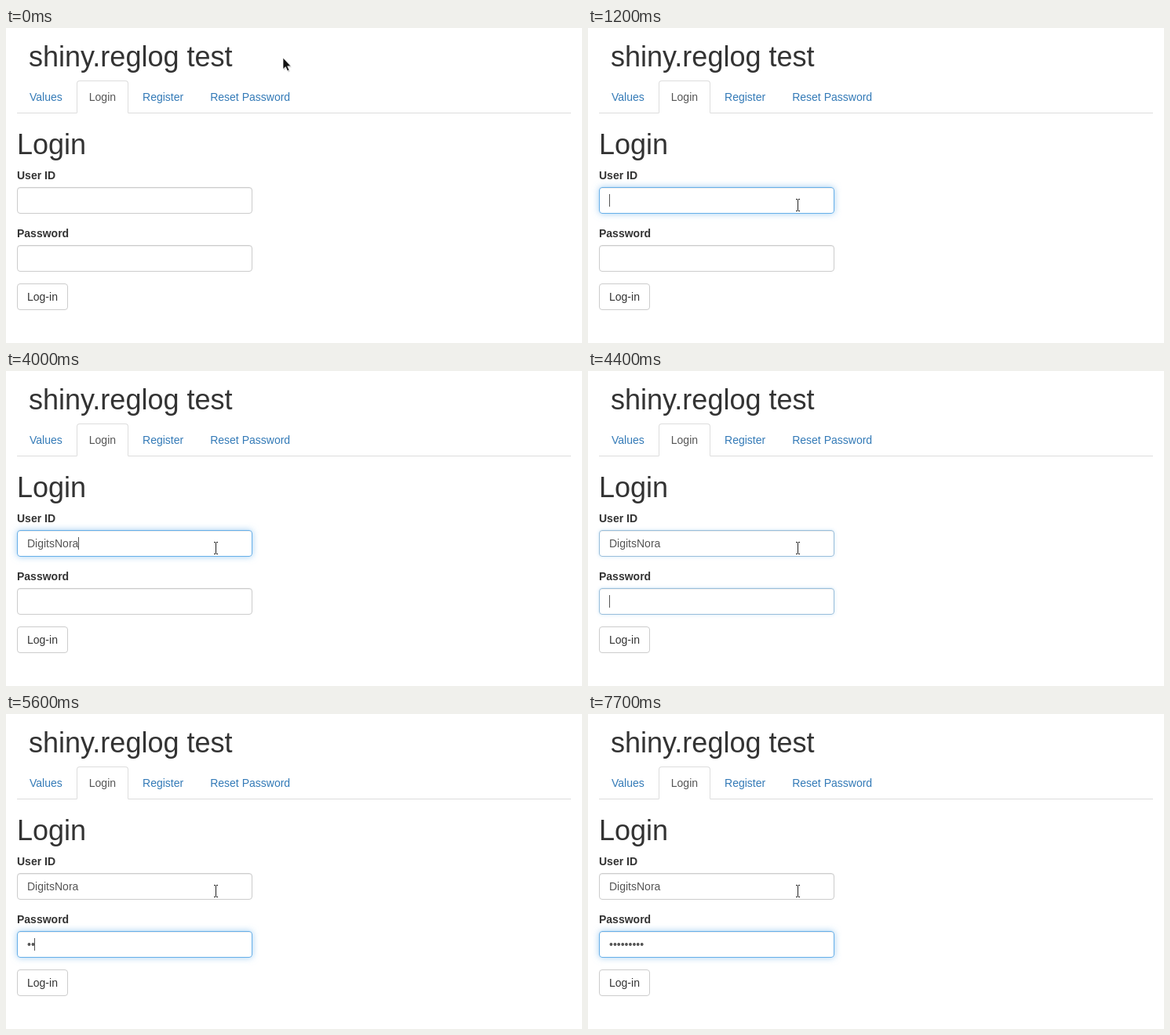
These frames come from a looping animation (734x402 px, 8000 ms). An HTML page:

```html
<!DOCTYPE html>
<html lang="en">
<head>
<meta charset="utf-8">
<title>Login form</title>
<style>
* { box-sizing: border-box; }
html, body { margin: 0; width: 100%; height: 100%; overflow: hidden; background: #fff; }
body { position: relative; font: 14px/20px "Liberation Sans", Arial, sans-serif; color: #333; }
main { position: absolute; left: 14px; top: 17px; width: 706px; }
h1 { margin: 0 0 10px; font-size: 36px; font-weight: 500; line-height: 1.1; }
.title { padding-left: 15px; }
nav { display: flow-root; height: 42px; margin-bottom: 20px; border-bottom: 1px solid #ddd; }
nav span { float: left; height: 42px; margin-right: 2px; padding: 10px 15px; border: 1px solid transparent; border-radius: 4px 4px 0 0; color: #337ab7; }
nav .active { color: #555; background: #fff; border-color: #ddd #ddd transparent; }
label { display: block; margin-bottom: 5px; font-weight: 700; }
.field { width: 300px; height: 34px; margin-bottom: 15px; padding: 6px 12px; border: 1px solid #ccc; border-radius: 4px; color: #555; white-space: pre; }
.button { display: inline-block; height: 34px; padding: 6px 12px; border: 1px solid #ccc; border-radius: 4px; }
#caret { position: absolute; width: 1px; height: 16px; background: #555; }
svg { position: absolute; left: 0; top: 0; overflow: visible; pointer-events: none; }
</style>
</head>
<body>
<main>
  <h1 class="title">shiny.reglog test</h1>
  <nav><span>Values</span><span class="active">Login</span><span>Register</span><span>Reset Password</span></nav>
  <h1>Login</h1>
  <label>User ID</label>
  <div class="field" id="user"><span></span></div>
  <label>Password</label>
  <div class="field" id="pass"><span></span></div>
  <div class="button">Log-in</div>
</main>
<div id="caret"></div>
<svg id="arrow" width="14" height="20">
  <path d="M2 3V17L5.2 14.2L7.6 19.4L10 18.3L7.7 13.3H12Z" fill="#000" opacity=".18"/>
  <path d="M1 1V15.6L4.3 12.6L6.6 17.8L9 16.8L6.7 11.8H11.2Z" fill="#111" stroke="#fff" stroke-width=".7"/>
</svg>
<svg id="beam" width="7" height="17" shape-rendering="crispEdges">
  <path d="M0 0H7V2H5V15H7V17H0V15H2V2H0Z" fill="#fff"/>
  <path d="M1 0H3V1H4V0H6V1H4V15H6V16H4V15H3V16H1V15H3V1H1Z" fill="#222"/>
</svg>
<script>
const LOOP = 8000, STEP = 100;
const USER = "DigitsNora";
const userKeys = [2200, 2300, 2700, 2700, 2800, 3000, 3500, 3700, 3800, 4000];
const passKeys = [5300, 5600, 5700, 5900, 6100, 6300, 6600, 6800, 7300];
const caretOff = [[0, 1100], [1600, 2200], [4900, 5300], [7700, LOOP]];
const FOCUS_USER = 1100, FOCUS_PASS = 4400;

// Pointer position at each step; it becomes a text beam inside the field.
const path = [[352, 37], [361, 43], [358, 59], [339, 112], [312, 155], [285, 187],
  [266, 230], [267, 227], [267, 227], [267, 226]];
const BEAM_FROM = 6;

const $ = id => document.getElementById(id);
const user = $("user"), pass = $("pass"), caret = $("caret"), arrow = $("arrow"), beam = $("beam");

const typed = (keys, t) => keys.filter(k => k <= t).length;
const focusLevel = (t, start) => t < start ? 0 : t < start + STEP ? 0.5 : 1;
const mix = (a, b, p) => Math.round(a + (b - a) * p);

function setFocus(field, p) {
  field.style.borderColor = `rgb(${mix(204, 102, p)},${mix(204, 175, p)},${mix(204, 233, p)})`;
  field.style.boxShadow =
    `inset 0 1px 1px rgba(0,0,0,.075), 0 0 ${8 * p}px rgba(102,175,233,${0.6 * p})`;
}

function setText(field, text) {
  field.firstChild.textContent = text;
}

function placeCaret(field, t) {
  const box = field.getBoundingClientRect();
  const width = field.firstChild.getBoundingClientRect().width;
  caret.style.left = Math.floor(box.left + 13 + width) + "px";
  caret.style.top = Math.round(box.top + 9) + "px";
  const hidden = caretOff.some(([from, to]) => t >= from && t < to);
  caret.style.visibility = hidden ? "hidden" : "visible";
}

function placePointer(t) {
  const i = Math.min(t / STEP, path.length - 1);
  const [x, y] = path[i];
  const isBeam = i >= BEAM_FROM;
  arrow.style.display = isBeam ? "none" : "block";
  beam.style.display = isBeam ? "block" : "none";
  arrow.style.transform = `translate(${x}px,${y}px)`;
  beam.style.transform = `translate(${x - 3}px,${y - 8}px)`;
}

function draw(now) {
  const t = Math.floor(now % LOOP / STEP) * STEP;
  const passFocus = focusLevel(t, FOCUS_PASS);
  setText(user, USER.slice(0, typed(userKeys, t)));
  setText(pass, "•".repeat(typed(passKeys, t)));
  setFocus(user, focusLevel(t, FOCUS_USER) * (1 - passFocus));
  setFocus(pass, passFocus);
  placeCaret(t < FOCUS_PASS ? user : pass, t);
  placePointer(t);
}

function tick() {
  draw(performance.now());
  requestAnimationFrame(tick);
}
tick();
</script>
</body>
</html>
```
